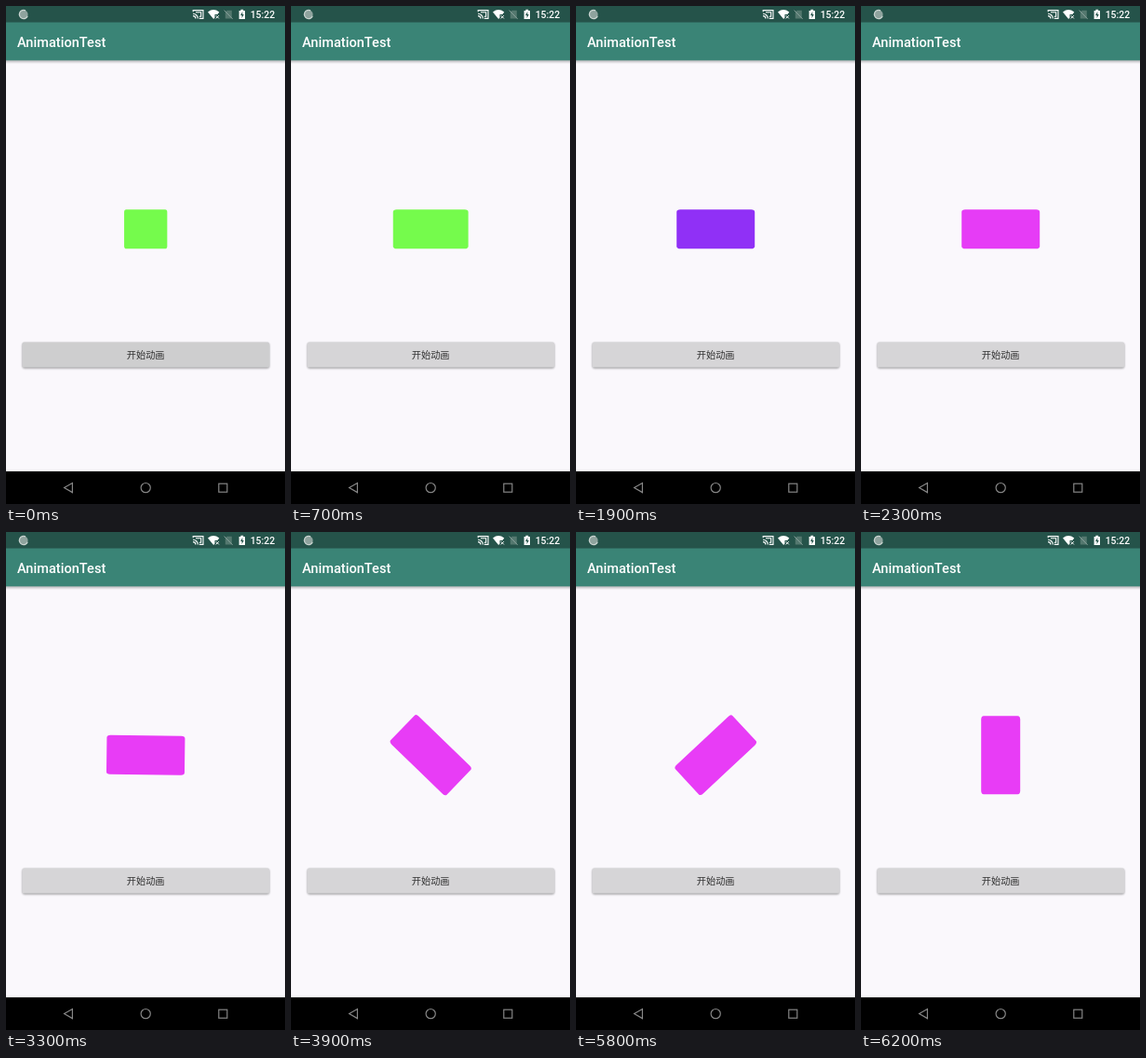
An HTML page for the animation above (6.3 s loop, 300 px wide and 534 px high).

```html
<!DOCTYPE html>
<html lang="zh">
<head>
<meta charset="utf-8">
<title>AnimationTest</title>
<style>
  html, body { margin: 0; width: 100%; height: 100%; overflow: hidden; background: #faf8fc; }
  svg { display: block; width: 100%; height: 100%; }
  text { font-family: Roboto, "Noto Sans CJK SC", "Noto Sans CJK", sans-serif; font-weight: 500; }
</style>
</head>
<body>
<svg viewBox="0 0 300 534">
  <defs>
    <linearGradient id="shade" x2="0" y2="1">
      <stop stop-color="#000" stop-opacity=".28"/>
      <stop offset="1" stop-color="#000" stop-opacity="0"/>
    </linearGradient>
    <filter id="soft" x="-5%" y="-20%" width="110%" height="150%">
      <feGaussianBlur stdDeviation=".8"/>
    </filter>
  </defs>
  <rect width="300" height="534" fill="#faf8fc"/>

  <!-- bars -->
  <rect y="58" width="300" height="4" fill="url(#shade)"/>
  <rect width="300" height="58.3" fill="#3a8476"/>
  <rect width="300" height="17.5" fill="#25534a"/>
  <text x="12" y="44" font-size="14.6" fill="#fff">AnimationTest</text>

  <!-- status icons -->
  <circle cx="19" cy="9" r="4.6" fill="#8fa39e"/>
  <path d="M21 4.9A4.6 4.6 0 1 0 23.2 10.8" fill="none" stroke="#c9d3d0" stroke-width="1.3"/>
  <g fill="none" stroke="#fff" stroke-width="1.1">
    <path d="M201.2 6.2V4.6H212V13.4H207.8M201 8.2a5.3 5.3 0 0 1 5.3 5.3M201 10.6a2.9 2.9 0 0 1 2.9 2.9"/>
    <path d="M204 6.7h5.7v4.6h-2"/>
  </g>
  <path d="M217 6.5Q223 1.7 229.3 6.5L227.3 9H224.5V12.4L223.2 14Z" fill="#fff"/>
  <path d="M225.7 10.2l3.2 3.2m0-3.2l-3.2 3.2" stroke="#fff"/>
  <path d="M237.6 4.7h5.2v8.8h-7V6.6Z" fill="#54786f"/>
  <path d="M234.6 4.6l9 9.2" stroke="#89a19b"/>
  <path d="M250.6 5h1.8V3.8h2.8V5H257v9h-6.4Z" fill="#fff"/>
  <path d="M254.3 6l-2.2 3.9h1.5V13l2.2-4h-1.5Z" fill="#25534a"/>
  <text x="262.7" y="12.8" font-size="10.4" fill="#fff">15:22</text>

  <!-- start button -->
  <rect x="17.7" y="361.6" width="265.4" height="27" rx="2" fill="#000" opacity=".4" filter="url(#soft)"/>
  <rect x="17.5" y="360.6" width="265.6" height="27" rx="1.6" fill="#d6d5d7"/>
  <rect id="press" x="17.5" y="360.6" width="265.6" height="27" rx="1.6"/>
  <text x="150.2" y="377.6" font-size="10.2" fill="#303030" text-anchor="middle">开始动画</text>

  <rect id="box" x="-21" y="-21" width="42" height="42" rx="2" ry="2.8"/>

  <!-- navigation -->
  <rect y="499" width="300" height="35"/>
  <g fill="none" stroke="#858585" stroke-width="1.2">
    <path d="M71.4 511.6v10l-8.8-5Z"/>
    <circle cx="150.2" cy="516.6" r="5.1"/>
    <rect x="228.8" y="512.2" width="9" height="9"/>
  </g>
</svg>
<script>
const LOOP = 6300;
// moments (in 100 ms) at which the screen refreshes
const ticks = [0, 2, 3, 4, 6, 7, 9, 12, 13, 15, 16, 18, 19, 21, 23,
               33, 34, 36, 39, 46, 52, 55, 58, 61, 62];
const turn = [[3290, 0], [3400, 8], [3900, 44], [4600, 65], [5200, 28],
              [5500, -14], [5800, -43], [6100, -84], [6200, -90]];
const green = [117, 251, 76], blue = [0, 28, 245], magenta = [232, 60, 246];

const box = document.getElementById('box');
const press = document.getElementById('press');

const part = (t, from, to) => Math.min(1, Math.max(0, (t - from) / (to - from)));
const ease = p => (1 - Math.cos(Math.PI * p)) / 2;
const mix = (a, b, p) => a + (b - a) * p;

function along(keys, t) {
  let value = keys[0][1];
  for (let i = 1; i < keys.length; i++) {
    const [t0, a] = keys[i - 1], [t1, b] = keys[i];
    if (t >= t0) value = mix(a, b, part(t, t0, t1));
  }
  return value;
}

function draw(now) {
  const time = now % LOOP;
  const t = 100 * ticks.filter(k => k * 100 <= time).pop();
  const stretch = 1 + ease(part(t, -235, 900));
  const tint = ease(part(t, 1270, 2360));
  const rgb = t < 1200 ? green : blue.map((c, i) => Math.round(mix(c, magenta[i], tint)));
  box.setAttribute('transform',
    `translate(150.2 239.2) rotate(${along(turn, t)}) scale(${stretch} 1)`);
  box.setAttribute('fill', `rgb(${rgb})`);
  press.setAttribute('opacity', 0.035 * (1 - part(t, 100, 700)));
}

const start = performance.now();
function frame() {
  draw(performance.now() - start);
  requestAnimationFrame(frame);
}
frame();
</script>
</body>
</html>
```
